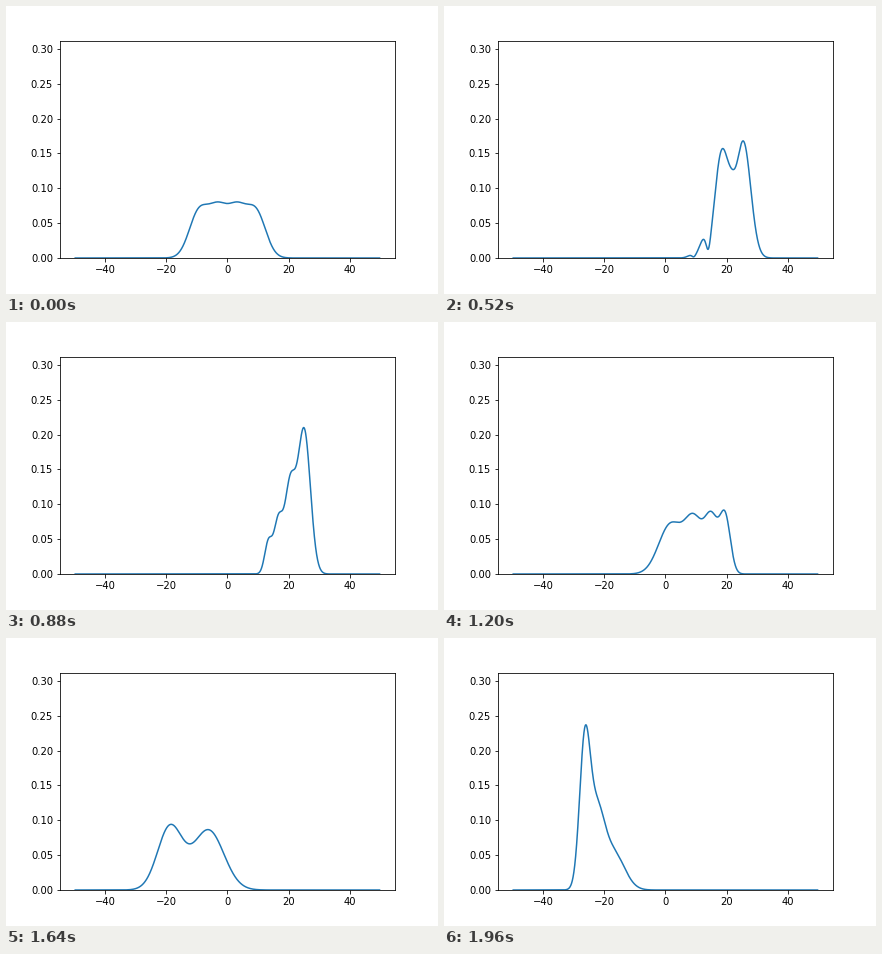
A matplotlib script that plays this animation: 432 px wide and 288 px high, repeating every 2000 ms.

```python
import numpy as np
import matplotlib.pyplot as plt
from matplotlib.animation import FuncAnimation

FRAMES, STEP = 50, 40
EDGE = 49.8
NORM = 2  # total probability under the curve

grid = np.linspace(-60, 60, 6001)
dx = grid[1] - grid[0]
mass = 1 / (1 + np.exp(-np.linspace(-11, 11, 1500)))


def train(lead, gap, width, n=4, fade=1, stretch=1):
    """A row of Gaussian crests, each a scaled copy of the one before."""
    total = 0
    for j in range(n):
        total = total + fade ** j * np.exp(-((grid - lead) / width) ** 2)
        lead += gap * stretch ** j
        width *= stretch
    return total


def crest(centre, width):
    return train(centre, 0, width, n=1)


# Wave shapes at key times (ms); heights follow from the norm
SHAPES = {
    0: train(9.45, -6.3, 4.45),
    320: train(22, -12.9, 3.72, n=2, fade=.725, stretch=1.65)
         + .325 * crest(16.5, 3.85),
    720: train(22.55, -5.1, 1.7, n=3, fade=.14, stretch=.76)
         + crest(26.2, 2.93),
    880: train(25.1, -4.6, 2.9, fade=.6, stretch=.84),
    1200: train(19.6, -4.4, 2.4, fade=.97, stretch=1.32),
    1640: train(-6.2, -12.6, 7.1, n=2, fade=1.05, stretch=.81),
    1960: train(-26.4, 3.8, 2.45, n=3, fade=.52, stretch=1.45),
}


def describe(p):
    """Mean and spread, plus the standardised quantiles and density."""
    p = p / (p.sum() * dx)
    mean = (grid * p).sum() * dx
    spread = np.sqrt(((grid - mean) ** 2 * p).sum() * dx)
    q = np.interp(mass, np.cumsum(p) * dx, grid)
    return (mean, spread), (q - mean) / spread, spread * np.interp(q, grid, p)


times = np.array(list(SHAPES), float)
moments, quantiles, heights = zip(*map(describe, SHAPES.values()))
moments = np.array(moments)
slopes = np.gradient(moments, times, axis=0, edge_order=2)


def density(t):
    """Carry the probability mass smoothly from one key time to the next."""
    k = min(np.searchsorted(times, t, side="right") - 1, len(times) - 2)
    h = times[k + 1] - times[k]
    u = (t - times[k]) / h
    v = 1 - u
    mean, spread = (
        v * v * ((1 + 2 * u) * moments[k] + u * h * slopes[k])
        + u * u * ((1 + 2 * v) * moments[k + 1] - v * h * slopes[k + 1]))
    x = mean + spread * (v * quantiles[k] + u * quantiles[k + 1])
    y = NORM / (spread * (v / heights[k] + u / heights[k + 1]))
    return np.r_[-EDGE, x, EDGE], np.r_[0, y, 0]


fig, ax = plt.subplots(figsize=(6, 4), dpi=72)
fig.subplots_adjust(left=.125, right=.9, bottom=.125, top=.88)
ax.set(xlim=(-1.1 * EDGE, 1.1 * EDGE), ylim=(0, .312),
       xticks=range(-40, 41, 20), yticks=np.arange(7) * .05)
line, = ax.plot([], [], color="C0", lw=1.5)


def draw(frame):
    line.set_data(*density(frame * STEP))
    return line,


anim = FuncAnimation(fig, draw, frames=FRAMES, interval=STEP, repeat=True,
                     repeat_delay=0)
plt.show()
```
